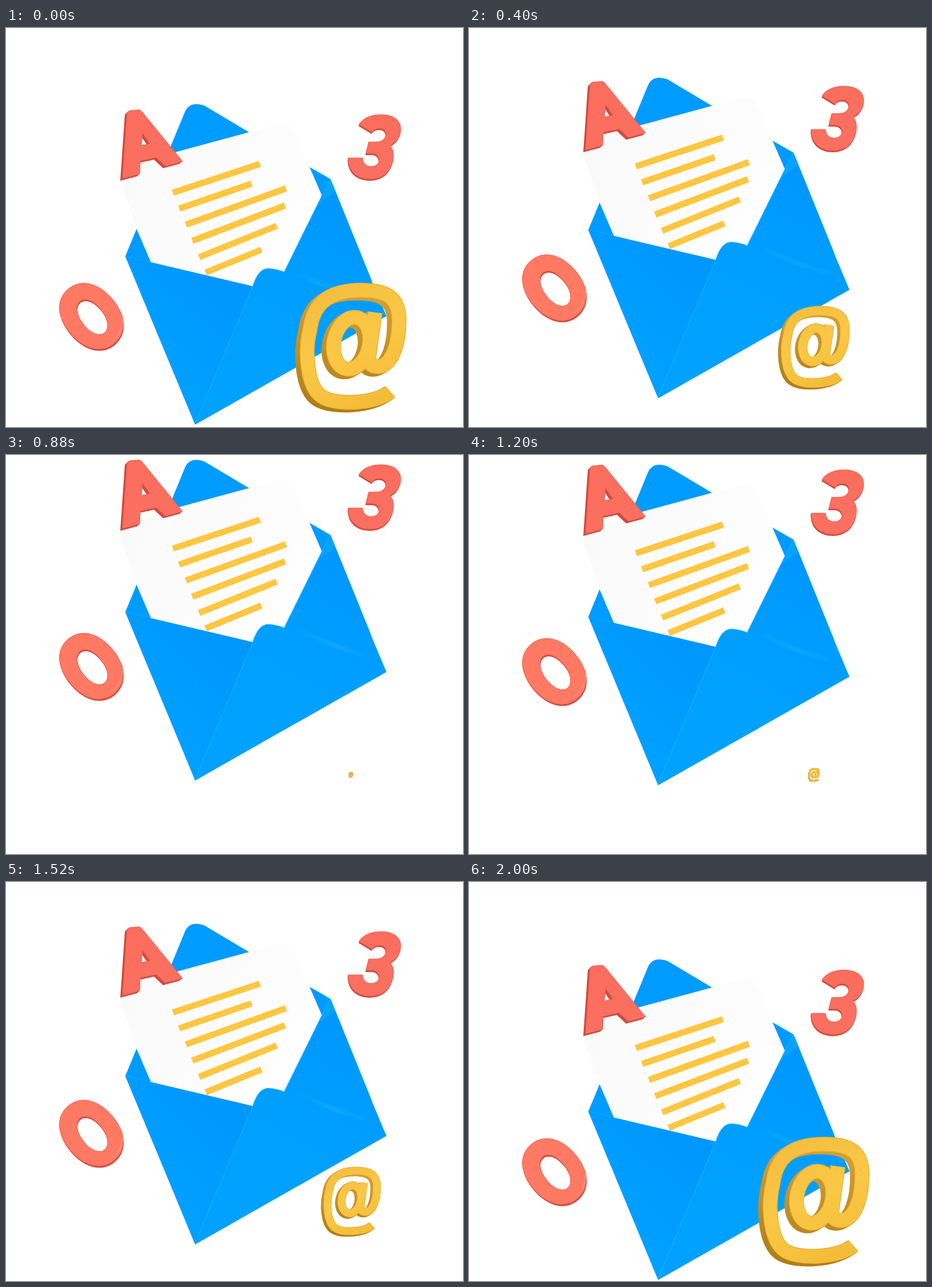
These frames come from a looping animation (800 by 700 pixels, 2.04 s). An HTML page:

```html
<!DOCTYPE html>
<html lang="en">
<head>
<meta charset="utf-8">
<title>Open letter</title>
<style>
  html, body { margin: 0; width: 100%; height: 100%; overflow: hidden; background: #fff; }
  svg { display: block; width: 800px; height: 700px; }
</style>
</head>
<body>
<svg viewBox="0 0 800 700">
  <defs>
    <linearGradient id="left" gradientUnits="userSpaceOnUse" x1="400" y1="440" x2="250" y2="600">
      <stop offset="0" stop-color="#0096ff"/><stop offset="1" stop-color="#00a1ff"/>
    </linearGradient>
    <linearGradient id="right" gradientUnits="userSpaceOnUse" x1="600" y1="330" x2="470" y2="560">
      <stop offset="0" stop-color="#0098ff"/><stop offset=".45" stop-color="#009dff"/><stop offset="1" stop-color="#00a1ff"/>
    </linearGradient>
    <linearGradient id="paper" x1="0" y1="0" x2="1" y2=".4">
      <stop offset="0" stop-color="#f9f9f9"/><stop offset="1" stop-color="#fefefe"/>
    </linearGradient>
    <linearGradient id="coral" x1="0" y1="0" x2=".3" y2="1">
      <stop offset="0" stop-color="#fb6d5d"/><stop offset="1" stop-color="#fa7060"/>
    </linearGradient>
    <linearGradient id="gold" gradientUnits="userSpaceOnUse" x1="540" y1="450" x2="650" y2="670">
      <stop offset="0" stop-color="#f3bd3e"/><stop offset=".5" stop-color="#fac846"/><stop offset="1" stop-color="#f3bb36"/>
    </linearGradient>
    <linearGradient id="goldSide" gradientUnits="userSpaceOnUse" x1="560" y1="450" x2="540" y2="660">
      <stop offset="0" stop-color="#d8a233"/><stop offset="1" stop-color="#b07e14"/>
    </linearGradient>
    <linearGradient id="streak" gradientUnits="userSpaceOnUse" x1="500" y1="430" x2="650" y2="485">
      <stop offset="0" stop-color="#25b4ff" stop-opacity="0"/><stop offset=".5" stop-color="#25b4ff" stop-opacity=".4"/>
      <stop offset="1" stop-color="#25b4ff" stop-opacity="0"/>
    </linearGradient>
    <filter id="soft" x="-20%" y="-50%" width="140%" height="200%"><feGaussianBlur stdDeviation="2"/></filter>
  </defs>

  <g id="envelope">
    <path fill="#009bff" d="M209 400L312 150Q320 127 347 136L424 182L568 265L500 460H260Z"/>
    <path fill="url(#paper)" d="M201 270Q196 255 213 247L296 218L480 168Q498 164 505 183L553 294L487 440L432 460L254 412L228 351Z"/>
    <g id="lines" stroke="#ffc642" stroke-width="11"></g>
    <path fill="url(#left)" d="M208.5 400L254 411L432 453L450 500L331 696Z"/>
    <path fill="url(#right)" d="M331 696L432 453C439 431 448 421 461 422Q474 423 487 428L553 294L568 264.5L639 440L641 446L666 505.5Z"/>
    <path fill="#18b4ff" opacity=".35" d="M568 265L553 294L547 308L577 286Z"/>
    <path d="M515 432Q570 461 640 479" fill="none" stroke="url(#streak)" stroke-width="7" filter="url(#soft)"/>
    <path d="M331 694L432 453C439 431 448 421 461 422Q474 423 487 428L553 294L568 265" fill="none" stroke="#19b8ff" stroke-width="1.2" opacity=".8"/>
    <path d="M210 400L254 411" stroke="#19b0ff" stroke-width="1" opacity=".7"/>
  </g>
  <g id="letters"></g>
  <g id="at"></g>
</svg>
<script>
const $ = id => document.getElementById(id);
const LOOP = 2040, STEP = 40;

// Height of the floating letters over time: [ms, px]
const FLOAT = [[0, 0], [200, -15.5], [400, -50], [560, -83], [720, -113], [880, -135], [1000, -141],
  [1120, -135.5], [1200, -126], [1360, -98], [1520, -65], [1680, -31], [1840, -6], [2000, 2.4]];

const slope = i => {
  const a = FLOAT[Math.max(i - 1, 0)], b = FLOAT[Math.min(i + 1, FLOAT.length - 1)];
  return (b[1] - a[1]) / (b[0] - a[0]);
};

// Cubic Hermite curve through the table
function height(t) {
  let i = 0;
  while (i < FLOAT.length - 2 && t >= FLOAT[i + 1][0]) i++;
  const [t0, y0] = FLOAT[i], [t1, y1] = FLOAT[i + 1];
  const d = t1 - t0, u = (t - t0) / d, v = 1 - u;
  return y0 * v * v * (1 + 2 * u) + y1 * u * u * (3 - 2 * u)
    + d * u * v * (slope(i) * v - slope(i + 1) * u);
}

const BARS = [[292, 289, 444.5, 238.5], [303, 317, 430, 273], [315, 345, 490, 281.5],
  [326, 373.5, 488.5, 311.5], [338, 402, 474, 347], [349.5, 429, 447, 389]];
$('lines').innerHTML = BARS.map(([a, b, c, d]) => `<path d="M${a} ${b}L${c} ${d}"/>`).join('');

// Stack shifted copies behind a shape to give it depth
function extrude(draw, n, dx, dy, side) {
  let out = '';
  for (let i = n; i > 0; i--) out += `<g transform="translate(${i * dx} ${i * dy})">${draw(side)}</g>`;
  return out;
}

const solid = d => c => `<path fill-rule="evenodd" fill="${c}" d="${d}"/>`;

function coral(d, n, dx, dy, face = 'url(#coral)') {
  const shape = solid(d);
  return extrude(shape, n, dx, dy, '#d14c40') + shape(face)
    + `<path d="${d}" fill="none" stroke="#f0614f" stroke-width="1"/>`;
}

// Tilted oval as a closed path; k sets how full its shoulders are
function oval(x, y, a, b, deg, k = .5523) {
  const r = deg * Math.PI / 180, cos = Math.cos(r), sin = Math.sin(r);
  const p = (u, v) => `${x + a * u * cos - b * v * sin} ${y + a * u * sin + b * v * cos} `;
  const quarter = (u, v) => `C${p(u - k * v, v + k * u)}${p(k * u - v, u + k * v)}${p(-v, u)}`;
  return `M${p(1, 0)}${quarter(1, 0)}${quarter(0, 1)}${quarter(-1, 0)}${quarter(0, -1)}Z`;
}

const A = 'M216 145L234 143.5L239 148L309 234L279 242L263 227L235 233L234 256L204 264L212 148ZM239 184L237 206L252 203Z';
const THREE = 'M618 169C625 158 639 152 656 152C679 152 691 162 691 177C691 191 684 200 672 206C677 211 679 218 678 228C676 250 661 265 638 265C615 265 599 252 599 228L624 228C625 238 631 243 639 243C648 243 654 237 653 230C652 223 647 220 640 220L630 220L635 200L648 200C658 200 665 194 665 186C665 179 660 176 653 176C647 176 643 179 641 183Z';
const ZERO = oval(149.3, 505.5, 62.5, 47.5, 49, .6) + oval(151, 507, 35, 20, 53, .58);

$('letters').innerHTML = coral(A, 4, -1, 1) + coral(THREE, 3, -.3, 1) + coral(ZERO, 3, .3, 1, '#ff7963')
  + '<path d="M204 503C206 520 200 540 184 550" fill="none" stroke="#ff9d8b" stroke-width="2" opacity=".6"/>';

const RING = 'M673 638C650 658 578 664 552 646C526 628 523 565 532 530C538 478 572 460 622 460C668 460 688 474 688 512C688 558 674 594 650 594C639 594 633 587 636 571L646 499';
const BOWL = oval(605, 553, 46, 31, 102);
const atShape = w => c => `<g fill="none" stroke="${c}" stroke-linejoin="round">`
  + `<path d="${RING}" stroke-width="${w}"/><path d="${BOWL}" stroke-width="${w}"/></g>`;

$('at').innerHTML = extrude(atShape(26), 8, -1, .6, 'url(#goldSide)')
  + atShape(26)('#e6b038') + atShape(23.5)('url(#gold)');

function show(t) {
  const y = height(t), s = Math.min(1, Math.max(0, 1 + y / 141));
  $('envelope').setAttribute('transform', `translate(0 ${y * .925})`);
  $('letters').setAttribute('transform', `translate(0 ${y})`);
  $('at').setAttribute('transform', `translate(604 561) scale(${s}) translate(-604 -561)`);
}

const start = performance.now();
function tick() {
  const t = (performance.now() - start) % LOOP;
  show(Math.floor(t / STEP) * STEP);
  requestAnimationFrame(tick);
}
tick();
</script>
</body>
</html>
```
